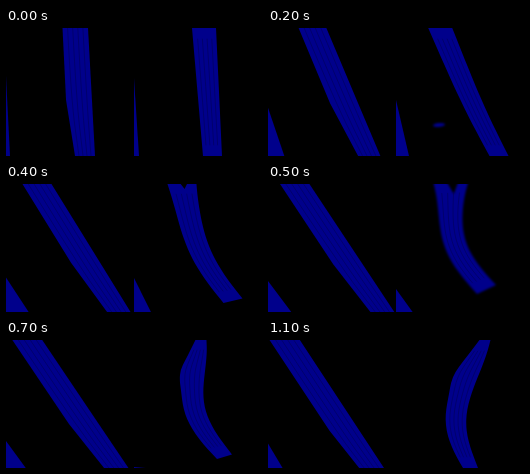
Write an HTML page with a canvas that moves like this. It is 256 px wide and 128 px high and loops after 1.2 s.

```html
<!DOCTYPE html>
<html lang="en">
<head>
<meta charset="utf-8">
<title>Blue bands</title>
<style>
html, body { margin: 0; width: 100%; height: 100%; overflow: hidden; background: #000; }
canvas { display: block; width: 256px; height: 128px; }
</style>
</head>
<body>
<canvas id="stage" width="256" height="128"></canvas>
<script>
const ctx = document.getElementById('stage').getContext('2d');
const STEP = 100, STEPS = 12, H = 128, HALF = 128;

const mix = (a, b, u) => a + (b - a) * u;
const ramp = (t, a, b) => Math.min(1, Math.max(0, (t - a) / (b - a)));
// Rises from a to its peak, then falls to b
const pulse = (t, a, peak, b) => ramp(t, a, peak) - ramp(t, peak, b);
const settle = t => Math.exp(-t / 3.3);
const swing = t => Math.max(0, Math.sin(Math.PI * t / 8.6));

function smooth(points) {
  for (let i = 0; i < points.length - 1; i++) {
    const [x, y] = points[i], [nx, ny] = points[i + 1];
    if (i === 0) ctx.lineTo(x, y);
    else ctx.quadraticCurveTo(x, y, (x + nx) / 2, (y + ny) / 2);
  }
  ctx.lineTo(...points[points.length - 1]);
}

function fill(points) {
  ctx.beginPath();
  points.forEach(p => ctx.lineTo(...p));
  ctx.fill();
}

// Fine darker threads running between two edges
function threads(a, b) {
  ctx.strokeStyle = 'rgba(0,0,75,.5)';
  ctx.lineWidth = 0.9;
  for (let u = 0.2; u < 0.9; u += 0.2) {
    ctx.beginPath();
    smooth(a.map((p, i) => [mix(p[0], b[i][0], u), mix(p[1], b[i][1], u)]));
    ctx.stroke();
  }
}

// Straight band tilting to rest, its left edge slightly bent
function drawBand(t) {
  const q = settle(t);
  const top = 57 * q - 0.5;
  const bottom = 92 - 23 * q + 16 * swing(t);
  const kinkY = 72 + 1.7 * t, v = kinkY / H;
  const topR = top + 30.5 - 5 * q, bottomR = bottom + 25 - 5 * q;
  const left = [[top, 0], [mix(top, bottom, v) - 3.5, kinkY], [bottom, H]];
  const right = [[topR, 0], [mix(topR, bottomR, v), kinkY], [bottomR, H]];
  fill([...left, ...[...right].reverse()]);
  threads(left, right);
}

function wedge(x, top, width) {
  if (top < H) fill([[x, top], [x + width, H], [x, H]]);
}

function drawWedges(t) {
  wedge(0, 104 - 56 * Math.exp(-t / 2.4), 15 - 11 * settle(t) + 11 * swing(t));
  wedge(HALF, 50 + 11 * t, 5 + 12 * swing(t));
}

// Ribbon that tilts, tears loose, then sways back as a bow
function drawRibbon(t) {
  const pull = (1 - ramp(t, 0, 3)) ** 1.7;
  const top = 167.5 + 30.5 * pull + 49.5 * ramp(t, 3, 11) ** 0.85;
  const bottom = 235.5 - 29 * pull - 17 * ramp(t, 3, 5) - 16 * ramp(t, 9, 11);
  const bow = 20 * ramp(t, 1.5, 6);
  const neck = ramp(t, 5, 7), fork = pulse(t, 3, 5, 7), lift = pulse(t, 3, 5, 9);
  const left = [], right = [];

  for (let i = 0; i <= 12; i++) {
    const v = i / 12;
    const sag = Math.sin(Math.PI * v) - 0.12 * Math.sin(2 * Math.PI * v);
    const x = mix(top, bottom, v) - bow * sag;
    const width = mix(24, 19, v) + (10 * fork - 13 * neck) * (1 - v) ** 6
      - 4 * neck * v ** 6;
    const bulge = 4.5 * neck * Math.exp(-(((v - 0.27) / 0.12) ** 2));
    left.push([x - width / 2 - bulge, v * (H - 18 * lift)]);
    right.push([x + width / 2, v * (H - 27 * lift)]);
  }

  const l = left[0][0], r = right[0][0];
  ctx.filter = lift > 0 ? `blur(${lift}px)` : 'none';
  ctx.beginPath();
  ctx.moveTo(l, -4);
  smooth(left);
  smooth([...right].reverse());
  ctx.lineTo(r, -4);
  if (fork > 0) {
    ctx.lineTo(mix(l, r, 0.74), -4);
    ctx.lineTo(mix(l, r, 0.59), 10 * fork);
    ctx.lineTo(mix(l, r, 0.35), -4);
  }
  ctx.fill();
  ctx.filter = 'none';
  threads(left.slice(1, -1), right.slice(1, -1));
}

function drawBlob(t) {
  const size = pulse(t, 1, 3, 4);
  if (size <= 0) return;
  ctx.filter = 'blur(1.3px)';
  ctx.beginPath();
  ctx.ellipse(171, 97, 12 * size, 4 * size, -0.08, 0, Math.PI * 2);
  ctx.fill();
  ctx.filter = 'none';
}

function draw(now) {
  const t = Math.floor(now / STEP) % STEPS;
  ctx.fillStyle = '#000';
  ctx.fillRect(0, 0, 2 * HALF, H);
  ctx.fillStyle = '#00008b';
  drawBand(t);
  drawWedges(t);
  drawRibbon(t);
  drawBlob(t);
}

const start = performance.now();
function tick() {
  draw(performance.now() - start);
  requestAnimationFrame(tick);
}
tick();
</script>
</body>
</html>
```
